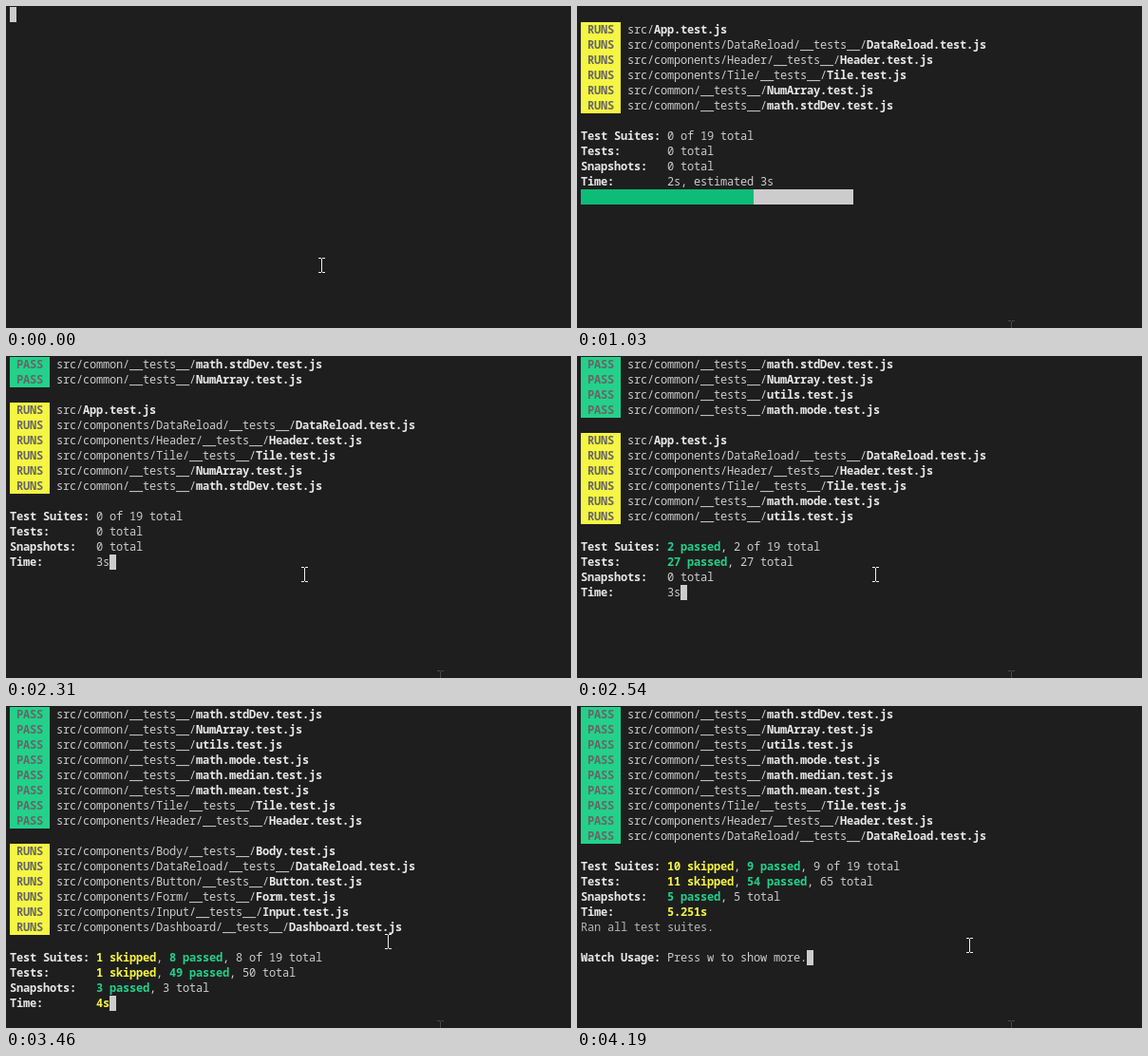
Recreate the animation shown at these times as an HTML page. Size 595 by 339 pixels, loop 4.26 s.

```html
<!DOCTYPE html>
<html lang="en">
<head>
<meta charset="utf-8">
<title>Test run</title>
<style>
html, body { margin: 0; width: 100%; height: 100%; overflow: hidden; background: #1e1e1e; }
#stage { position: relative; width: 595px; height: 339px; overflow: hidden; background: #1e1e1e; }
#term { position: absolute; left: 4px; top: 1px; color: #ccc;
  font: 500 12px/16px "Noto Sans Mono", "DejaVu Sans Mono", monospace;
  letter-spacing: -0.2px; font-variant-ligatures: none; font-kerning: none; }
#term div { height: 16px; white-space: pre; }
#term span { display: inline-block; height: 16px; vertical-align: top; }
b { font-weight: 700; color: #e8e8e8; }
.pass, .runs { width: 42px; font-weight: 700; color: #666; }
.pass { background: #23d18b; }
.runs { background: #f5f543; }
.ok { color: #23d18b; }
.skip { color: #f5f543; }
.dim { color: #b4b4b4; }
.cur { width: 7px; background: #ccc; }
svg { position: absolute; left: 0; top: 0; }
</style>
</head>
<body>
<div id="stage">
  <div id="term"></div>
  <svg width="595" height="339" fill="none" shape-rendering="crispEdges">
    <defs><path id="beam" d="M-3 -7.5H0M1 -7.5H4M.5 -7V7M-3 7.5H0M1 7.5H4"/></defs>
    <use id="trail" href="#beam" x="457" y="339" stroke="#484848"/>
    <use id="mouse" href="#beam" stroke="#eee"/>
  </svg>
</div>
<script>
const LOOP = 4260;
const $ = id => document.getElementById(id);
const term = $('term'), mouse = $('mouse'), trail = $('trail');

const common = /^(NumArray|utils|math\..*)$/;
const dirOf = name => name === 'App' ? 'src/'
  : common.test(name) ? 'src/common/__tests__/'
  : `src/components/${name}/__tests__/`;

const cursor = '<span class="cur"></span>';
const bold = (text, cls = '') => `<b class="${cls}">${text}</b>`;
const block = (cols, color) => `<span style="width:${cols * 7}px;background:${color}"></span>`;
const badge = (kind, name) =>
  `<span class="${kind}"> ${kind.toUpperCase()} </span> ${dirOf(name)}${bold(name + '.test.js')}`;
const label = text => bold(text.padEnd(13));

function count(skipped, passed, tail) {
  const parts = [];
  if (skipped) parts.push(bold(skipped + ' skipped', 'skip'));
  if (passed) parts.push(bold(passed + ' passed', 'ok'));
  return parts.concat(tail).join(', ');
}

const order = ['math.stdDev', 'NumArray', 'utils', 'math.mode', 'math.median',
  'math.mean', 'Tile', 'Header', 'DataReload'];

// suites and tests: [skipped, passed]; snaps: passed
function summary([s, p], [ts, tp], snaps, time) {
  return [
    label('Test Suites:') + count(s, p, `${p} of 19 total`),
    label('Tests:') + count(ts, tp, `${ts + tp} total`),
    label('Snapshots:') + count(0, snaps, `${snaps} total`),
    label('Time:') + time
  ];
}

function running(passes, runs, suites, tests, snaps, time) {
  return [
    ...order.slice(0, passes).map(n => badge('pass', n)), '',
    ...runs.split(' ').map(n => badge('runs', n)), '',
    ...summary(suites, tests, snaps, time)
  ];
}

const base = 'App DataReload Header Tile ';
const first = base + 'NumArray math.stdDev';
const late = bold('4s', 'skip') + cursor;
const none = [0, 0];

const waiting = sec => [
  ...running(0, first, none, none, 0, `${sec}s, estimated 3s`),
  block(13 * sec, '#0dbc79') + block(41 - 13 * sec, '#ccc')
];
const early = (passes, runs, suites, tests) =>
  running(passes, runs, suites, tests, 0, '3s' + cursor);
const done = (...extra) => [
  ...order.map(n => badge('pass', n)), '',
  ...summary([10, 9], [11, 54], 5, bold('5.251s', 'skip')),
  '<i class="dim" style="font-style:normal">Ran all test suites.</i>', ...extra
];

const six = base + 'Body Button';
const midRuns = base + 'math.median math.mean';
const screens = [
  [0, [cursor]],
  [100, ['', 'Determining test suites to run...' + cursor]],
  [250, waiting(1)],
  [1030, waiting(2)],
  [2160, early(0, first, none, none)],
  [2310, early(2, first, none, none)],
  [2460, early(2, base + 'math.mode utils', [0, 2], [0, 27])],
  [2540, early(4, base + 'math.mode utils', [0, 2], [0, 27])],
  [2700, early(4, midRuns, [0, 4], [0, 35])],
  [2850, early(6, midRuns, [0, 4], [0, 35])],
  [2930, early(6, six, [0, 6], [0, 43])],
  [3080, running(6, six, [0, 6], [0, 43], 0, late)],
  [3230, running(8, six, [0, 6], [0, 43], 0, late)],
  [3380, running(8, 'Body DataReload Button Form Input Dashboard', [1, 8], [1, 49], 3, late)],
  [3620, running(9, 'Body DataReload Button Form Input Dashboard', [1, 8], [1, 49], 3, late)],
  [3710, running(9, 'Body Button Form Input Dashboard Footer', [1, 9], [1, 54], 5, late)],
  [3880, running(9, 'Form Input Dashboard Footer Modal Table', [4, 9], [5, 54], 5, late)],
  [4030, done(cursor)],
  [4190, done('', label('Watch Usage:') + 'Press w to show more.' + cursor)]
];

const moves = [
  [0, 332, 273], [180, 350, 284], [250, 372, 297], [330, 396, 310], [400, 415, 319],
  [730, 432, 326], [810, 457, 339], [880, 480, 360],
  [2010, 354, 277], [2080, 346, 266], [2160, 333, 250], [2230, 320, 236], [2310, 314, 230],
  [3230, 338, 235], [3310, 370, 242], [3380, 402, 248], [3620, 413, 252]
];

const at = (table, t) => table.findLastIndex(step => step[0] <= t);
let shown = -1;

function draw(now) {
  const t = now % LOOP;
  const n = at(screens, t);
  if (n !== shown) {
    shown = n;
    term.innerHTML = screens[n][1].map(row => `<div>${row}</div>`).join('');
  }
  const [, x, y] = moves[at(moves, t)];
  mouse.setAttribute('x', x);
  mouse.setAttribute('y', y);
  trail.style.display = t >= 880 ? '' : 'none';
}

const start = performance.now();
function tick() {
  draw(performance.now() - start);
  requestAnimationFrame(tick);
}
tick();
</script>
</body>
</html>
```
